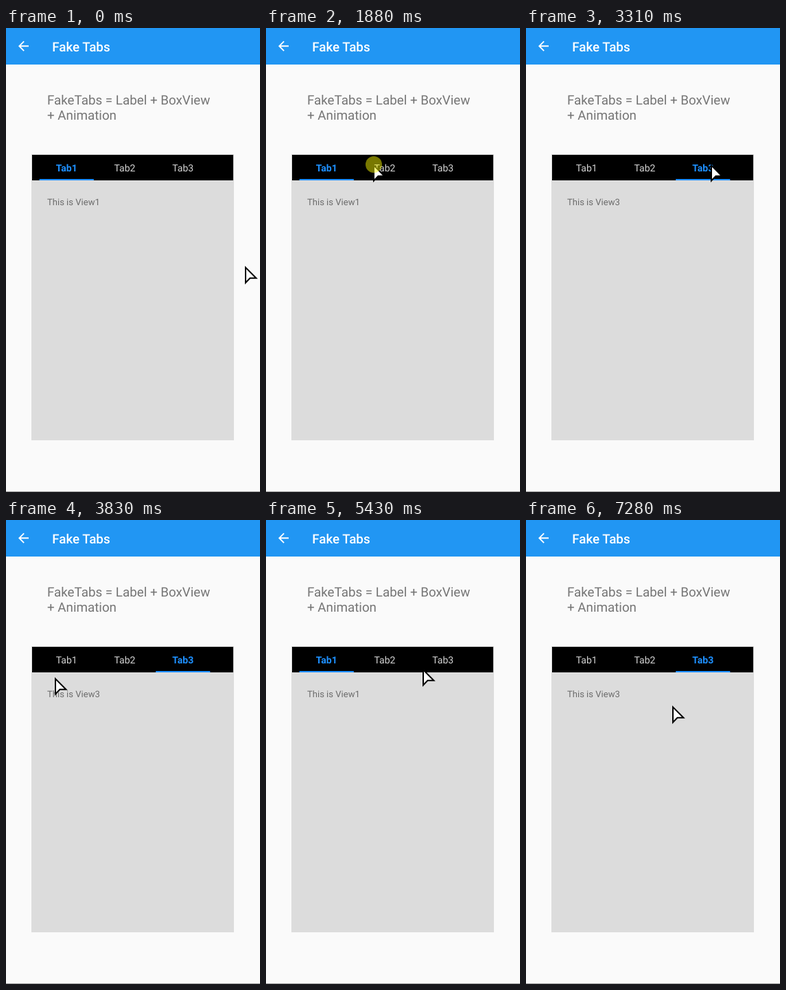
An HTML page for the animation above (7.47 s loop, 370 by 673 pixels).

```html
<!DOCTYPE html>
<html lang="en">
<head>
<meta charset="utf-8">
<title>Fake Tabs</title>
<style>
html, body { margin: 0; width: 100%; height: 100%; overflow: hidden; background: #fafafa; }
svg { display: block; width: 370px; height: 673px; font-family: Roboto, sans-serif; text-rendering: geometricPrecision; }
.title { font-size: 18.8px; font-weight: 500; fill: #fff; }
.label { font-size: 18.8px; fill: #757575; }
.view { font-size: 13.05px; fill: #6b6b6b; }
.tab { font-size: 14.06px; text-anchor: middle; fill: #d3d3d3; }
.tab.on { font-weight: 700; fill: #1e90ff; }
</style>
</head>
<body>
<svg viewBox="0 0 370 673">
  <rect width="370" height="673" fill="#fafafa"/>
  <rect width="370" height="53" fill="#2196f3"/>
  <path transform="translate(14.25 15) scale(.9375)" fill="#fff"
    d="M20 11H7.83l5.59-5.59L12 4l-8 8 8 8 1.41-1.41L7.83 13H20z"/>
  <text class="title" x="67.3" y="34">Fake Tabs</text>
  <text class="label" x="60" y="111">FakeTabs = Label + BoxView</text>
  <text class="label" x="60" y="133">+ Animation</text>
  <rect x="37" y="183" width="295" height="415" fill="#dcdcdc"/>
  <rect x="38" y="184" width="293" height="37" fill="#000"/>
  <text class="tab" x="88.2" y="207.5">Tab1</text>
  <text class="tab" x="173" y="207.5">Tab2</text>
  <text class="tab" x="257.7" y="207.5">Tab3</text>
  <rect id="line" y="219" width="79.3" height="2" fill="#1e90ff"/>
  <text id="view" class="view" x="60" y="257.3"></text>
  <rect y="672" width="370" height="1" fill="#a0a0a0"/>
  <g id="mouse">
    <path d="M1 2.4V24.5L7.5 17.7H16.4Z" fill="#fff" stroke="#000" stroke-width="2"/>
    <circle id="press" cx="1" cy="1" r="12" fill="#ff0" fill-opacity=".47"/>
  </g>
</svg>
<script>
const LOOP = 7470, PRESS = 140, SLIDE = 250, LEAD = 45;
const $ = id => document.getElementById(id);
const line = $('line'), view = $('view'), mouse = $('mouse'), press = $('press');
const tabs = [...document.querySelectorAll('.tab')];

const home = { x: 348, y: 345 };
// Pointer moves: start, end, x, y
const moves = [
  [0, 80, 346, 341], [540, 1040, 90, 197], [1340, 1660, 156, 197],
  [2345, 2635, 270, 197], [3290, 3870, 68, 228], [3870, 4060, 85, 206],
  [4360, 4730, 236, 228], [4850, 4960, 214, 220], [5260, 5590, 240, 211],
  [5780, 6650, 220, 260], [6820, 7250, 213, 269]
];
const clicks = [
  { at: 1880, tab: 1 }, { at: 2830, tab: 2 }, { at: 4200, tab: 0 }, { at: 5660, tab: 2 }
];

const clamp = u => Math.max(0, Math.min(1, u));
const ease = u => u * u * (3 - 2 * u);
const mix = (a, b, u) => a + (b - a) * u;
const lineX = tab => 48.6 + 84.75 * tab;

function pointer(t) {
  let { x, y } = home;
  for (const [start, end, toX, toY] of moves) {
    const u = ease(clamp((t - start) / (end - start)));
    x = mix(x, toX, u);
    y = mix(y, toY, u);
  }
  return `translate(${Math.round(x)} ${Math.round(y)})`;
}

function draw(t) {
  let tab = 0, x = lineX(0), down = false;
  for (const click of clicks) {
    const since = t - click.at;
    down ||= since >= 0 && since < PRESS;
    if (since < PRESS) break;
    x = mix(lineX(tab), lineX(click.tab), clamp((since - PRESS + LEAD) / SLIDE));
    tab = click.tab;
  }
  line.setAttribute('x', x);
  tabs.forEach((el, i) => el.classList.toggle('on', i === tab));
  view.textContent = `This is View${tab + 1}`;
  mouse.setAttribute('transform', pointer(t));
  press.setAttribute('visibility', down ? 'visible' : 'hidden');
}

const begin = performance.now();
function tick() {
  draw((performance.now() - begin) % LOOP);
  requestAnimationFrame(tick);
}
tick();
</script>
</body>
</html>
```
